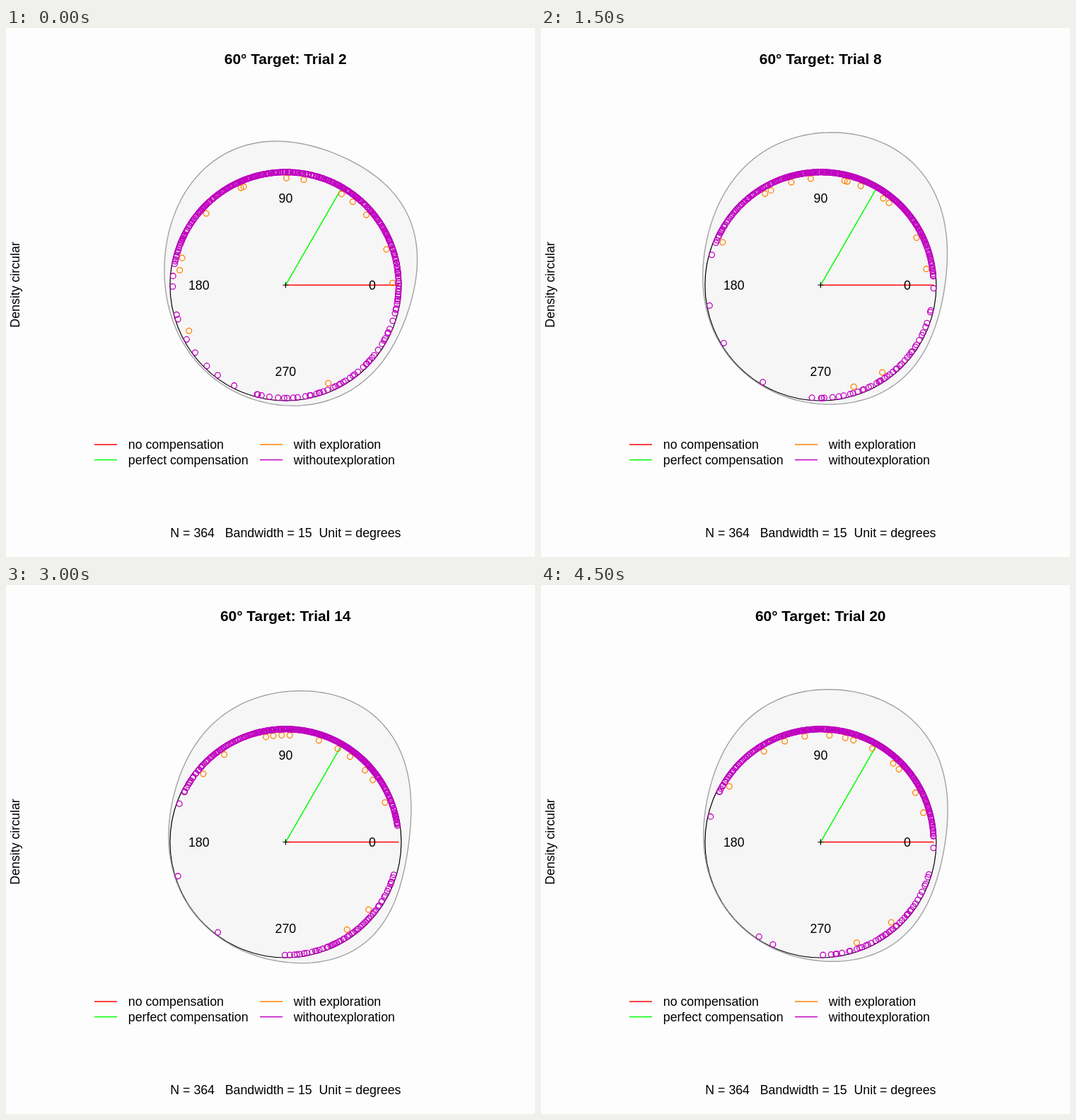
Write an HTML page that moves like this. It is 748 px wide and 748 px high and loops after 5 s.

```html
<!DOCTYPE html>
<html lang="en">
<head>
<meta charset="utf-8">
<title>Circular density by trial</title>
<style>
  html, body { margin: 0; width: 100%; height: 100%; overflow: hidden; background: #fdfdfd; }
  svg { display: block; width: 100%; height: 100%; }
  text { font: 17.75px "Liberation Sans", Arial, sans-serif; fill: #000; white-space: pre; }
  .mid { text-anchor: middle; }
  #title { font-size: 20.9px; font-weight: bold; }
  #dots { fill: none; stroke-width: 1.3; }
</style>
</head>
<body>
<svg viewBox="0 0 748 748">
  <path id="area" fill="#f6f6f6"/>
  <circle cx="395.4" cy="363.5" r="163.5" fill="none" stroke="#000" stroke-width="1.2"/>
  <path id="outline" fill="none" stroke="#a2a2a2" stroke-width="1.4"/>
  <g id="lines" stroke-width="1.5"></g>
  <path d="M391.4 363.5h8M395.4 359.5v8" stroke="#000" stroke-width="1.2"/>
  <g id="labels"></g>
  <g id="dots"></g>
  <text id="title" class="mid" x="395.2" y="50.5"></text>
  <text class="mid" transform="translate(19.3 363) rotate(-90)">Density circular</text>
  <text class="mid" x="395.4" y="720.4" xml:space="preserve">N = 364   Bandwidth = 15  Unit = degrees</text>
</svg>
<script>
const CX = 395.4, CY = 363.5, R = 163.5, STEP = 500, COUNT = 10;
const BANDWIDTH = 15, OUTER = 350, INNER = 14;
const RED = '#f00', GREEN = '#0f0', ORANGE = '#ff8000', PURPLE = '#c000c0';
const el = id => document.getElementById(id);

// Three clusters of answers, each [centre, width, height], at key trials
const keys = [
  { n: 2, clusters: [[108, 35, 39], [32, 27, 30], [-55, 30, 9]] },
  { n: 4, clusters: [[110, 31, 37], [50, 34, 36], [-54, 27, 11]] },
  { n: 10, clusters: [[112, 28, 29], [59, 30, 54], [-50, 26, 11]] },
  { n: 14, clusters: [[112, 27, 29], [57, 30, 51], [-53, 25, 17]] },
  { n: 16, clusters: [[112, 27, 33], [56, 32, 49], [-52, 25, 13]] }
];

function clustersAt(n) {
  const i = keys.findIndex(k => k.n >= n);
  if (i < 0) return keys[keys.length - 1].clusters;
  if (i === 0) return keys[0].clusters;
  const a = keys[i - 1], b = keys[i], t = (n - a.n) / (b.n - a.n);
  return a.clusters.map((c, j) => c.map((v, k) => v + (b.clusters[j][k] - v) * t));
}

// Answers spread evenly round the circle become rarer
const strayAt = n => 0.5 + 1.8 * Math.exp((2 - n) / 4);

function seeded(seed) {
  let s = seed * 7919 + 17;
  return () => (s = (s * 16807) % 2147483647) / 2147483647;
}

function polar(r, deg) {
  const a = deg * Math.PI / 180;
  return [(CX + r * Math.cos(a)).toFixed(2), (CY - r * Math.sin(a)).toFixed(2)];
}

const wrap = deg => ((deg + 540) % 360 + 360) % 360 - 180;

function radius(n, deg) {
  return clustersAt(n).reduce(
    (r, [mid, width, height]) => r + height * Math.exp(-0.5 * (wrap(deg - mid) / width) ** 2),
    R + strayAt(n));
}

function outlinePath(n) {
  const pts = [];
  for (let deg = 0; deg < 360; deg += 2) pts.push(polar(radius(n, deg), deg));
  return 'M' + pts.join('L') + 'Z';
}

// Draws answers from the clusters, without the smoothing of the curve
function sample(n, total, rnd) {
  const clusters = clustersAt(n);
  const weights = clusters.map(([, width, height]) => width * height * Math.sqrt(2 * Math.PI));
  const stray = strayAt(n) * 360;
  const sum = weights.reduce((a, b) => a + b, stray);
  const slots = (weight, place) => {
    const count = Math.round(total * weight / sum);
    return Array.from({ length: count }, (_, i) => place((i + rnd()) / count));
  };
  return clusters.flatMap(([mid, width], j) => {
    const sd = Math.sqrt(width ** 2 - BANDWIDTH ** 2);
    return slots(weights[j], p => {
      const u = 2 * p - 1;
      return mid + sd * (1.4 * u + 0.5 * u ** 3);
    });
  }).concat(slots(stray, p => p * 360));
}

function markers(angles, r, color) {
  return `<g stroke="${color}">` + angles.map(deg => {
    const [x, y] = polar(r, deg);
    return `<circle cx="${x}" cy="${y}" r="3.9"/>`;
  }).join('') + '</g>';
}

const line = (x1, y1, x2, y2, color) =>
  `<line x1="${x1}" y1="${y1}" x2="${x2}" y2="${y2}" stroke="${color}"/>`;

const legend = [
  [125, 589, RED, 'no compensation'],
  [125, 610.6, GREEN, 'perfect compensation'],
  [359, 589, ORANGE, 'with exploration'],
  [359, 610.6, PURPLE, 'withoutexploration']
];
el('lines').innerHTML =
  line(CX, CY, ...polar(160, 0), RED) + line(CX, CY, ...polar(160, 60), GREEN) +
  legend.map(([x, y, color]) => line(x, y, x + 32, y, color)).join('');
el('labels').innerHTML =
  [0, 90, 180, 270].map(deg => {
    const [x, y] = polar(122.6, deg);
    return `<text class="mid" x="${x}" y="${+y + 6}">${deg}</text>`;
  }).join('') +
  legend.map(([x, y, , label]) => `<text x="${x + 47.8}" y="${y + 6.4}">${label}</text>`).join('');

let shown = -1;
function draw(ms) {
  const step = Math.floor(ms / STEP) % COUNT;
  if (step === shown) return;
  shown = step;
  const n = 2 * step + 2, rnd = seeded(n), path = outlinePath(n);
  el('title').textContent = `60° Target: Trial ${n}`;
  el('area').setAttribute('d', path);
  el('outline').setAttribute('d', path);
  el('dots').innerHTML =
    markers(sample(n, INNER, rnd), 151.2, ORANGE) + markers(sample(n, OUTER, rnd), 159.7, PURPLE);
}

const start = performance.now();
function tick() {
  draw(performance.now() - start);
  requestAnimationFrame(tick);
}
tick();
</script>
</body>
</html>
```
